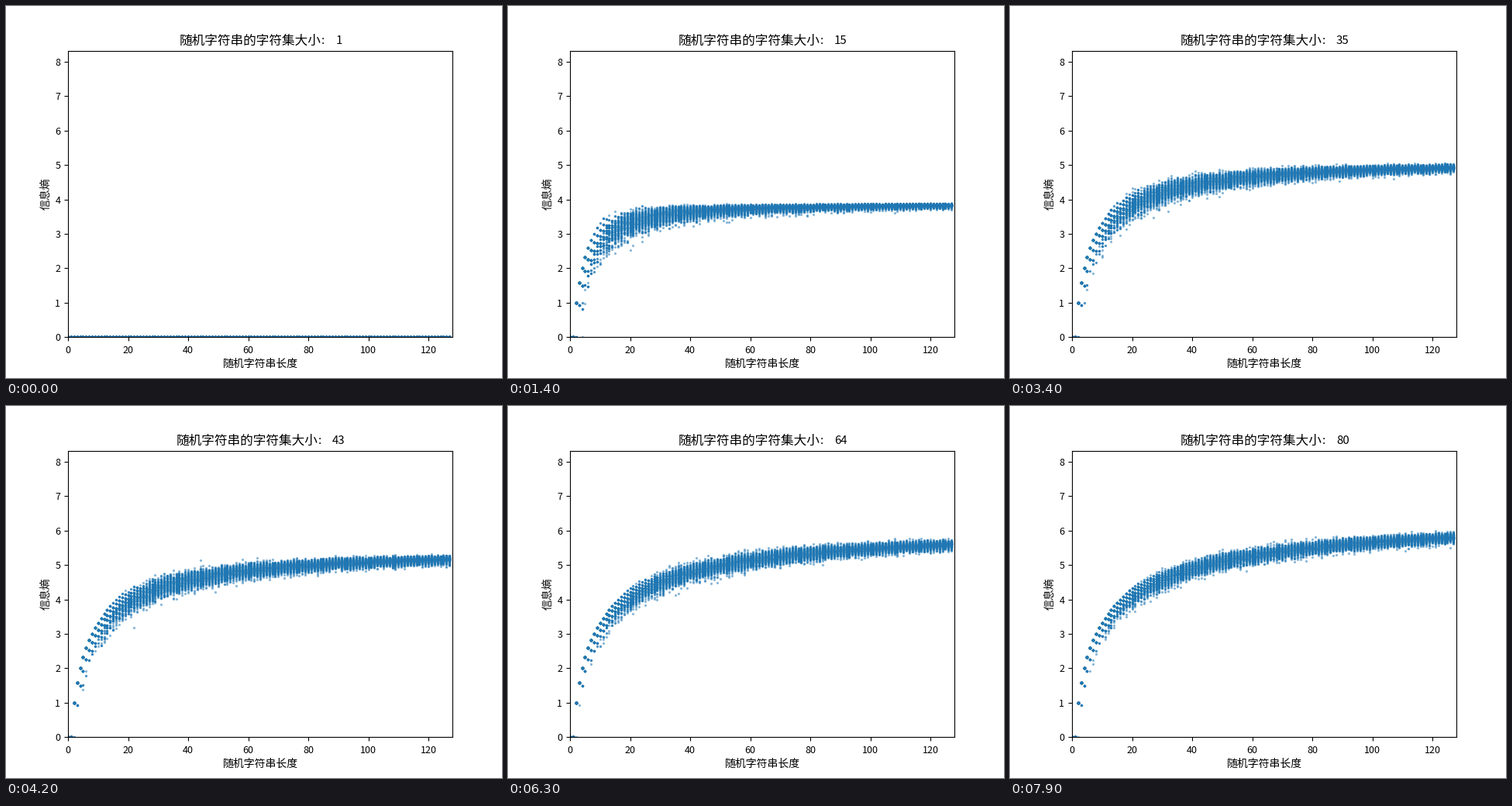
These frames come from a looping animation (640x480 px, 8000 ms). A matplotlib script:

```python
import numpy as np
import matplotlib.pyplot as plt
from matplotlib.animation import FuncAnimation

W, H, DPI = 640, 480, 100
FRAMES, STEP_MS = 80, 100
SAMPLES, MAX_LEN = 100, 128
EM = 12 / 72 * DPI              # title character width in pixels
HALF = 0.9                      # size factor that makes digits half a character wide

plt.rcParams["font.family"] = "Noto Sans CJK JP"
plt.rcParams["font.size"] = 10

lengths = np.repeat(np.arange(MAX_LEN), SAMPLES)
rows = np.repeat(np.arange(lengths.size), lengths)
safe_len = np.maximum(lengths, 1)
c = np.arange(MAX_LEN + 1)
c_log_c = c * np.log2(np.maximum(c, 1))


def entropies(size):
    """Shannon entropy of random strings over an alphabet of `size` characters."""
    rng = np.random.default_rng(size)
    chars = rng.integers(size, size=rows.size)
    counts = np.bincount(rows * size + chars, minlength=lengths.size * size)
    spread = c_log_c[counts.reshape(-1, size)].sum(axis=1)
    return np.maximum(np.log2(safe_len) - spread / safe_len, 0)


fig, ax = plt.subplots(figsize=(W / DPI, H / DPI), dpi=DPI)
ax.set(xlim=(0, 128), ylim=(0, 8.32))
ax.tick_params(labelsize=10 * HALF)
ax.tick_params(axis="x", pad=4)


def label(x, y, text, **kw):
    return fig.text(x / W, 1 - y / H, text, va="baseline", **kw)


label(328, 465.5, "随机字符串长度", ha="center")
label(55.5, 242.4, "信息熵", ha="center", rotation=90, rotation_mode="anchor")
title = label(0, 49.3, "随机字符串的字符集大小", fontsize=12)
colon = label(0, 49.3, ":", fontsize=12 * HALF)
number = label(0, 49.3, "", fontsize=12 * HALF)
dots = ax.scatter(lengths, np.zeros(lengths.size), s=2, color="#1f77b4", alpha=0.4)


def update(i):
    size = i + 1
    dots.set_offsets(np.column_stack([lengths, entropies(size)]))
    number.set_text(str(size))
    left = 328 - (11 + (2 + len(str(size))) / 2) * EM / 2
    for part, offset in ((title, 0), (colon, 11), (number, 12.08)):
        part.set_x((left + offset * EM) / W)
    return dots, title, colon, number


anim = FuncAnimation(fig, update, frames=FRAMES, interval=STEP_MS,
                     repeat=True, repeat_delay=0, blit=False)
plt.show()
```
